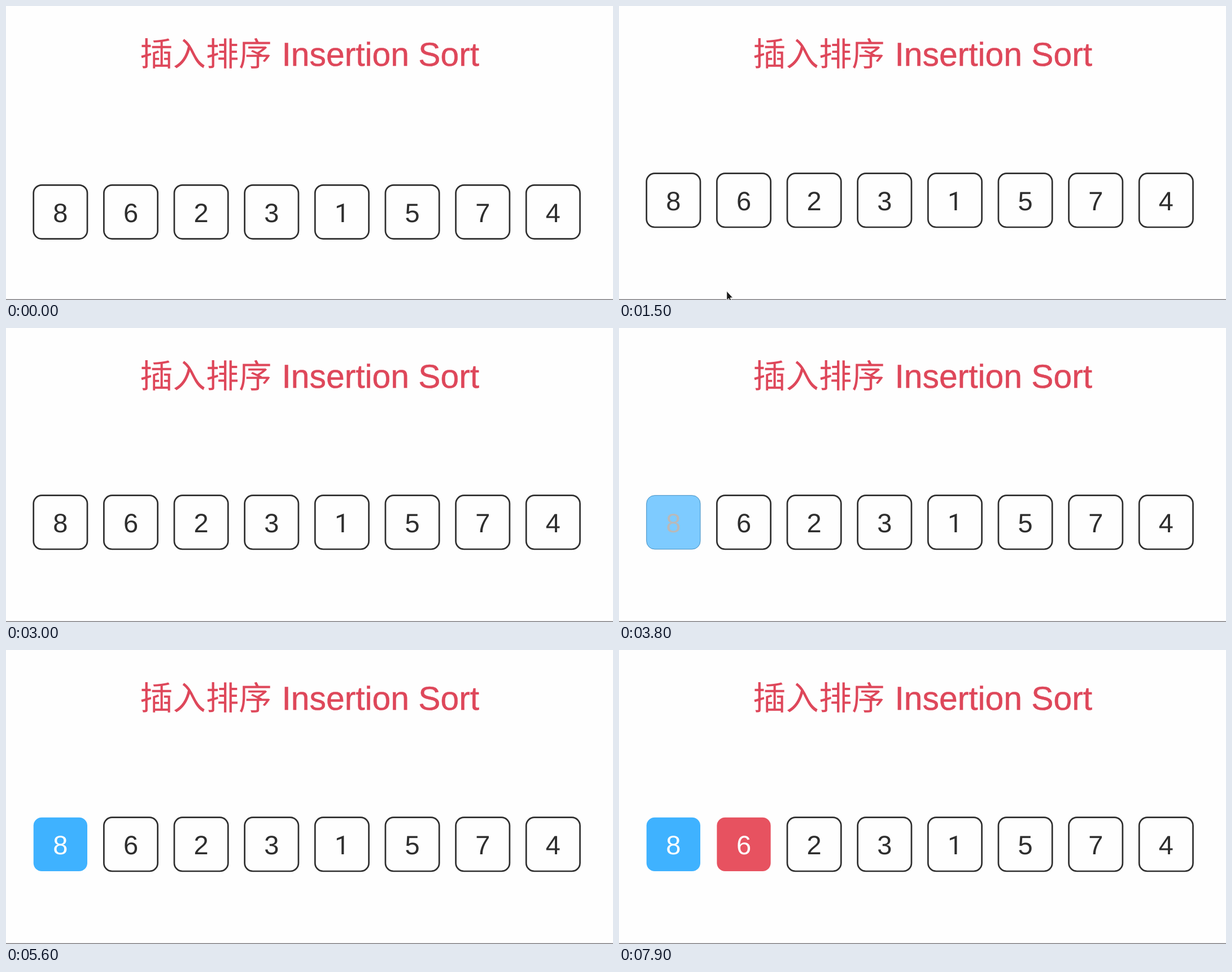
An HTML page for the animation above (8000 ms loop, 1075x521 px).

```html
<!DOCTYPE html>
<html lang="zh">
<head>
<meta charset="utf-8">
<title>插入排序</title>
<style>
  html, body { margin: 0; width: 100%; height: 100%; overflow: hidden; background: #fefefe; }
  svg { display: block; width: 1075px; height: 521px; }
  text { font-family: "Liberation Sans", Arial, sans-serif; text-rendering: geometricPrecision; }
  .title { fill: #de475a; }
  .cjk { font-family: "Noto Sans CJK SC", "Noto Sans CJK", sans-serif; font-size: 58.3px; }
  .latin { font-size: 58.8px; stroke: #de475a; stroke-width: .5px; }
  .digit { font-size: 47px; text-anchor: middle; }
  .one { font-family: Roboto, Inter, sans-serif; font-size: 46px; }
</style>
</head>
<body>
<svg viewBox="0 0 1075 521">
  <rect width="1075" height="521" fill="#fefefe"/>
  <text class="title cjk" x="237.3" y="106" lang="zh-Hans">插入排序</text>
  <text class="title latin" x="488.5" y="106">Insertion Sort</text>
  <g id="row"></g>
  <rect y="519.6" width="1075" height="1.4" fill="#77757a"/>
  <path id="pointer" d="M0 0V16.5L3.7 13.2L6.2 19L8.8 17.8L6.4 12.1H11Z"
        fill="#1c1c1c" stroke="#fff" stroke-width="1"/>
</svg>
<script>
const LOOP = 8000;
const VALUES = [8, 6, 2, 3, 1, 5, 7, 4];
const PITCH = 124.65;
const SIZE = 95.3;
const LINE = 2.7;
const INK = [46, 46, 46];
const PAPER = [254, 254, 254];
const BLUE = [63, 178, 255];
const RED = [231, 82, 96];

// Tile index, target colour, start and length of the fade
const FILLS = [
  { tile: 0, color: BLUE, start: 3600, length: 300 },
  { tile: 1, color: RED, start: 7500, length: 300 }
];

const row = document.getElementById('row');
const pointer = document.getElementById('pointer');

function add(parent, tag, attrs) {
  const el = document.createElementNS('http://www.w3.org/2000/svg', tag);
  for (const key in attrs) el.setAttribute(key, attrs[key]);
  parent.appendChild(el);
  return el;
}

const tiles = VALUES.map((value, i) => {
  const x = 48.7 + i * PITCH;
  const box = add(row, 'rect', { x, y: 296.7, width: SIZE, height: SIZE, rx: 14.5 });
  const label = add(row, 'text', {
    class: value === 1 ? 'digit one' : 'digit', x: x + SIZE / 2, y: 362.3
  });
  label.textContent = value;
  return { box, label };
});

const progress = (t, start, length) => Math.min(1, Math.max(0, (t - start) / length));
const easeOut = p => 1 - (1 - p) ** 3;
const mix = (a, b, p) => `rgb(${a.map((v, i) => Math.round(v + (b[i] - v) * p))})`;

function paint({ box, label }, color, p) {
  box.setAttribute('fill', mix(PAPER, color, p));
  box.setAttribute('stroke', mix(INK, color, p));
  box.setAttribute('stroke-width', LINE * (1 - p));
  label.setAttribute('fill', mix(INK, PAPER, p));
}

function draw(t) {
  const drop = 20.7 * (1 - easeOut(progress(t, 0, 600)));
  row.setAttribute('transform', `translate(0 ${drop})`);

  for (const { tile, color, start, length } of FILLS) {
    paint(tiles[tile], color, progress(t, start, length));
  }

  const shown = easeOut(progress(t, 1100, 300)) - easeOut(progress(t, 1900, 300));
  pointer.setAttribute('transform', `translate(190.7 ${523 - 18 * shown})`);
}

tiles.forEach(tile => paint(tile, INK, 0));

const begin = performance.now();
function tick(now) {
  draw(Math.max(0, now - begin) % LOOP);
  requestAnimationFrame(tick);
}
draw(0);
requestAnimationFrame(tick);
</script>
</body>
</html>
```
